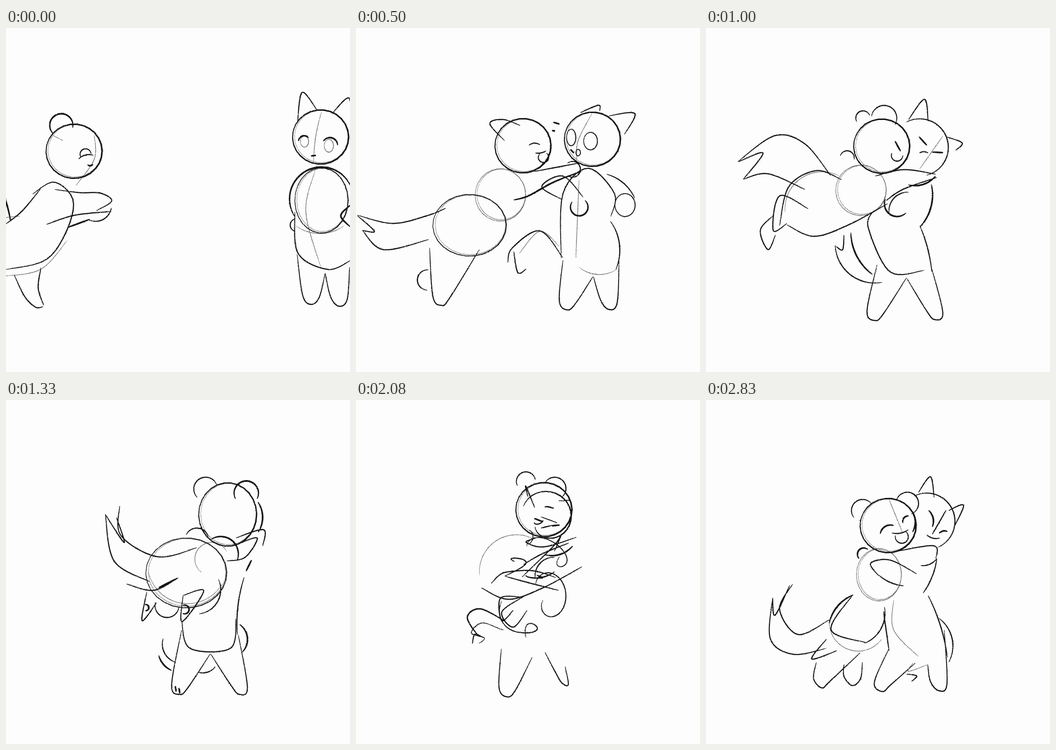
An HTML page for the animation above (3410 ms loop, 748 by 748 pixels).

```html
<!DOCTYPE html>
<html lang="en">
<head>
<meta charset="utf-8">
<title>Running hug</title>
<style>
html, body { margin: 0; width: 100%; height: 100%; overflow: hidden; background: #fdfdfd; }
svg { display: block; width: 100vw; height: 100vh; }
</style>
</head>
<body>
<svg viewBox="0 0 748 748">
  <filter id="grain" x="0" y="0" width="748" height="748" filterUnits="userSpaceOnUse">
    <feTurbulence type="fractalNoise" baseFrequency=".7" numOctaves="2" seed="4"/>
    <feDisplacementMap in="SourceGraphic" scale="2.2" xChannelSelector="R" yChannelSelector="G"/>
  </filter>
  <g filter="url(#grain)" fill="#161616">
    <path id="faint" opacity=".62"/>
    <path id="dark"/>
  </g>
</svg>
<script>
const N = 28, LOOP = 3410;
const steps = f => Array.from({ length: N + 1 }, (_, j) => f(j / N));

// Smooth curve through a few points.
function curve(p) {
  const last = p.length / 2 - 1;
  const at = (i, k) => p[2 * Math.max(0, Math.min(last, i)) + k];
  return steps(t => {
    const i = Math.min(last - 1, Math.floor(t * last)), u = t * last - i;
    return [0, 1].map(k => {
      const a = at(i - 1, k), b = at(i, k), c = at(i + 1, k), d = at(i + 2, k);
      return b + u / 2 * (c - a + u * (2 * a - 5 * b + 4 * c - d + u * (3 * (b - c) + d - a)));
    });
  });
}

// Circular arc from one point to another; a positive bulge turns clockwise.
function arc([x1, y1, x2, y2, bulge]) {
  const c = Math.hypot(x2 - x1, y2 - y1), ux = (x2 - x1) / c, uy = (y2 - y1) / c;
  const a = 2 * Math.atan(2 * bulge / c), r = c / 2 / Math.sin(a);
  return steps(t => {
    const q = a * (2 * t - 1), s = r * Math.sin(q), h = r * (Math.cos(q) - Math.cos(a));
    return [(x1 + x2) / 2 + ux * s + uy * h, (y1 + y2) / 2 + uy * s - ux * h];
  });
}

// Odd counts end in a bulge, even counts are points.
const pen = w => (...n) => ({ w, p: n.length % 2 ? arc(n) : curve(n) });
const fine = pen(1.4), mid = pen(2.6), bold = pen(3.7);

// Starts at the left and overlaps itself a little, like a drawn ring.
const oval = w => (x, y, rx, ry = rx) => ({
  w, echo: rx > 30,
  p: steps(t => {
    const a = Math.PI * (1 + 2.14 * t);
    return [x + rx * Math.cos(a), y + ry * Math.sin(a)];
  })
});
const ring = oval(2.2), hoop = oval(1.6), skull = (x, y) => oval(3.4)(x, y, 61, 59);
const leg = (x1, y1, x, y, x2, y2) => mid(x1, y1, x - 18, y - 20, x, y, x + 18, y - 15, x2, y2);

// Parts: d = dog, c = cat; h head, b body, a arms, t tail, l legs.
const dogRun = {
  dh: [skull(148, 268), bold(102, 229, 145, 217, 37), mid(163, 281, 185, 274, 15),
    bold(177, 297, 189, 296, -3), mid(158, 285, 190, 277, 5), fine(103, 234, 124, 245),
    fine(192, 233, 192, 285, 152, 343)],
  db: [mid(58, 361, 105, 335, 146, 375, 130, 445, 85, 505, 0, 525), fine(133, 462, 75, 525, -10, 540),
    mid(75, 350, 35, 398, 0, 426)],
  da: [mid(106, 351, 160, 358, 205, 359, 230, 376, 197, 397), mid(88, 427, 150, 407, 229, 399),
    mid(229, 391, 180, 417, 14), bold(136, 433, 182, 416)],
  dt: [bold(-15, 340, 10, 420, 3), fine(-10, 413, 30, 409)],
  dl: [mid(18, 537, 40, 583, 64, 607, 80, 606), mid(76, 522, 70, 565, 82, 603)]
};
const catRun = {
  ch: [skull(684, 237), mid(634, 203, 644, 140, 676, 178), mid(709, 186, 745, 152, 752, 200),
    bold(636, 246, 658, 239, 8), bold(690, 246, 721, 255, 12), bold(663, 278, 674, 277),
    fine(686, 183, 669, 290, -4), hoop(649, 247, 9, 12), hoop(702, 256, 10, 14)],
  cb: [bold(628, 410, 750, 345, 76), mid(628, 400, 635, 490, 700, 525, 750, 505), ring(686, 375, 58, 71),
    fine(630, 430, 735, 430, -17), fine(672, 310, 652, 400, 685, 522)],
  ca: [bold(750, 384, 728, 408, 748, 432), mid(629, 415, 629, 442, -11)],
  cl: [leg(633, 492, 663, 601, 694, 533), leg(694, 533, 724, 605, 747, 520)]
};
const dogGrab = {
  dh: [skull(363, 256), mid(323, 245, 291, 208, 320, 199, 357, 212), mid(376, 255, 400, 254, 4),
    mid(390, 272, 414, 267, -2), mid(400, 273, 414, 272, -20)],
  db: [hoop(314, 363, 55, 57), ring(247, 429, 80, 67)],
  da: [mid(388, 312, 483, 294), bold(343, 374, 375, 365, 430, 335, 490, 312), mid(460, 294, 462, 322, 27)],
  dt: [mid(3, 407, 80, 425, 155, 408, 195, 392), mid(3, 408, 40, 442, 14, 440), mid(14, 440, 60, 482, 158, 460)],
  dl: [leg(160, 478, 185, 603, 268, 482), mid(158, 526, 155, 570, -23)],
  fx: [bold(429, 205, 443, 209), bold(426, 223, 433, 224)]
};
const catGrab = {
  ch: [skull(514, 242), mid(488, 184, 527, 168, 530, 180), mid(550, 191, 606, 186, 584, 231),
    ring(468, 238, 10, 18), ring(510, 246, 15, 19), bold(466, 264, 474, 272),
    fine(513, 186, 483, 245, 480, 290), ring(483, 271, 5, 7)],
  cb: [mid(446, 500, 450, 360, 505, 305, 562, 360, 554, 410), mid(553, 420, 565, 525, 14),
    fine(485, 520, 568, 524, -14), fine(485, 330, 478, 500)],
  ca: [mid(545, 318, 606, 370, 9), mid(448, 373, 404, 345, 450, 322, 494, 368),
    bold(470, 378, 498, 375, -32), ring(585, 385, 22, 25)],
  cl: [leg(450, 505, 460, 613, 515, 541), leg(516, 540, 550, 612, 572, 500)],
  ct: [mid(450, 500, 400, 441, 340, 478, 330, 510), fine(442, 475, 400, 442, 355, 490),
    mid(343, 486, 352, 532, 370, 524)]
};
const dogLeap = {
  dh: [skull(382, 257), mid(360, 192, 411, 210, 33), mid(328, 204, 356, 190, 17),
    bold(411, 246, 423, 268), mid(404, 272, 428, 277, -15)],
  db: [hoop(337, 353, 55), mid(160, 430, 180, 345, 240, 310, 295, 330),
    mid(176, 428, 235, 453, 310, 428, 395, 382), fine(172, 400, 290, 322, 42)],
  da: [mid(368, 322, 430, 308, 500, 318), mid(392, 375, 430, 350, 502, 325),
    mid(292, 278, 322, 286, 15), bold(440, 341, 499, 322, -9)],
  dt: [mid(70, 290, 150, 234, 215, 252, 271, 321), mid(70, 291, 124, 272, 81, 329), mid(81, 329, 135, 317, 215, 351)],
  dl: [mid(222, 393, 160, 365, 146, 440, 176, 425), mid(146, 408, 118, 440, 135, 482, 151, 450)]
};
const catLeap = {
  ch: [mid(435, 205, 480, 320, 70), mid(440, 200, 475, 155, 483, 203), mid(524, 237, 557, 250, 543, 266),
    bold(463, 236, 480, 255), bold(492, 270, 516, 271), mid(464, 272, 483, 272, 3), fine(465, 306, 515, 235)],
  cb: [mid(475, 527, 400, 530, 353, 435, 362, 400), mid(465, 430, 491, 530, 4), bold(465, 433, 490, 340, -12)],
  ca: [bold(390, 372, 435, 402, -22), mid(440, 357, 398, 402, -14)],
  cl: [leg(372, 515, 368, 636, 436, 543), leg(437, 545, 497, 634, 490, 520)],
  ct: [bold(362, 536, 315, 445, 12), mid(383, 553, 281, 472, 30), mid(283, 475, 297, 482, 300, 450)]
};
const dogNear = {
  dh: [oval(3)(482, 249, 63, 69), bold(499, 215, 546, 215, 39), mid(416, 212, 458, 184, 31)],
  db: [fine(425, 375, 480, 330, 45), ring(392, 376, 88, 76), fine(310, 375, 470, 400, -55), bold(332, 408, 374, 387)],
  da: [mid(500, 300, 560, 282, 558, 318), mid(500, 315, 546, 300, 520, 342, 480, 350),
    mid(392, 293, 440, 300, 18), bold(446, 303, 503, 348, 26)],
  dt: [mid(247, 231, 250, 295, 330, 341, 415, 321), mid(216, 249, 257, 310, 240, 255),
    mid(216, 248, 235, 350, 312, 395), mid(262, 400, 320, 414, 372, 388)],
  dl: [mid(385, 425, 383, 482, 430, 415, 385, 425), mid(306, 418, 296, 480, 328, 440),
    mid(325, 440, 376, 450, -28), mid(420, 465, 462, 390, -22), bold(302, 445, 303, 458, 8), bold(384, 447, 384, 464, 14)]
};
const catNear = {
  ch: [bold(548, 222, 548, 288, 10)],
  cb: [mid(500, 475, 488, 540, 400, 540, 382, 480), mid(518, 385, 503, 510, -6), bold(522, 372, 534, 348)],
  cl: [leg(382, 500, 378, 640, 444, 552), leg(445, 552, 507, 640, 505, 510), bold(368, 622, 370, 634), bold(376, 626, 378, 638)],
  ct: [bold(508, 488, 514, 548, 14), mid(455, 580, 418, 592, 6), mid(342, 518, 368, 570, -12), bold(332, 555, 360, 588, -5)]
};
const dogSwing = {
  dh: [skull(377, 213), mid(404, 161, 424, 207, 31), mid(316, 162, 366, 150, 31), mid(352, 213, 380, 196, 4),
    mid(314, 253, 328, 239, 3), mid(360, 158, 342, 215), bold(425, 180, 402, 274, 24)],
  db: [mid(402, 275, 430, 302, 500, 305, 540, 345), mid(370, 360, 437, 415, 515, 435)],
  da: [mid(358, 270, 275, 300, 300, 322, 400, 272), mid(278, 334, 365, 290), fine(404, 280, 370, 335, 16)],
  dt: [mid(595, 472, 655, 390, 620, 325, 534, 330), mid(562, 405, 510, 408, 565, 418, 508, 430),
    mid(508, 430, 555, 470, 608, 470), mid(540, 345, 550, 410, 30)],
  dl: [mid(438, 457, 410, 490, 430, 513, 450, 482), mid(525, 440, 458, 475, 490, 499, 535, 458), fine(400, 390, 440, 457, -14)]
};
const catSwing = {
  ch: [skull(296, 250), mid(250, 214, 205, 212, 236, 258), fine(300, 195, 325, 162), bold(254, 272, 276, 268),
    bold(300, 270, 312, 266), mid(282, 278, 312, 266, -3), mid(281, 195, 302, 292), fine(266, 197, 285, 300)],
  cb: [ring(278, 499, 72, 71), ring(316, 364, 58, 71), bold(270, 330, 238, 415, 10)],
  ca: [mid(290, 383, 330, 362, 370, 338)],
  cl: [leg(202, 560, 232, 648, 272, 569), mid(327, 545, 362, 632, -4), mid(272, 569, 312, 618), bold(340, 637, 366, 634)],
  ct: [mid(230, 420, 145, 390, 105, 460, 165, 578), fine(200, 440, 145, 410, 130, 470, 210, 520, 195, 578),
    mid(165, 578, 162, 530, 195, 576), bold(183, 422, 206, 475)]
};
const dogHug = {
  dh: [skull(396, 273), mid(414, 219, 446, 248, 36), mid(322, 256, 360, 226, 25), bold(379, 291, 408, 273, 8),
    mid(404, 289, 440, 282, -4), bold(428, 267, 441, 252, 5), mid(412, 294, 434, 286, -22), fine(398, 216, 428, 290)],
  db: [hoop(376, 380, 49, 57), mid(350, 528, 272, 500, 318, 425), fine(268, 480, 382, 520, -45),
    mid(345, 529, 388, 450, -16), bold(268, 485, 320, 424, 10)],
  da: [mid(410, 330, 495, 317, 500, 345), mid(467, 360, 502, 345, -5), bold(333, 345, 352, 325, 13)],
  dt: [mid(188, 401, 160, 455, 200, 510, 268, 478), mid(145, 430, 150, 468, 182, 403),
    mid(145, 430, 140, 520, 190, 553, 262, 540), mid(262, 520, 230, 563, 285, 545)],
  dl: [leg(240, 570, 252, 626, 335, 550), leg(300, 575, 318, 621, 340, 570)]
};
const catHug = {
  ch: [mid(452, 209, 505, 320, 63), mid(462, 201, 488, 167, 496, 212), mid(528, 240, 560, 229, 540, 275),
    bold(484, 240, 492, 276, 6), bold(507, 290, 525, 286, 3), mid(480, 293, 508, 300, -4),
    mid(522, 240, 492, 292), bold(447, 240, 449, 287, 7)],
  cb: [fine(462, 558, 408, 500, 408, 435), mid(398, 545, 386, 460), mid(472, 420, 502, 345, -5), mid(483, 425, 525, 560, 6)],
  ca: [mid(458, 378, 400, 348, 358, 355, 375, 382), mid(375, 380, 430, 404, -5)],
  cl: [leg(398, 540, 384, 634, 455, 572), leg(482, 575, 506, 632, 518, 500)],
  ct: [mid(507, 475, 528, 570, 18), fine(450, 572, 440, 590, 483, 575), mid(436, 596, 458, 600, 447, 612)]
};

const move = (s, dx, dy) => ({ ...s, p: s.p.map(([x, y]) => [x + dx, y + dy]) });
const leap = { ...dogLeap, ...catLeap };
const leapAgain = Object.fromEntries(Object.entries(leap).map(([k, v]) => [k, v.map(s => move(s, 58, 7))]));
const keys = [
  [0, { ...dogRun, ...catRun }], [6, { ...dogGrab, ...catGrab }], [12, leap],
  [16, { ...dogNear, ...catNear }], [21, { ...dogSwing, ...catSwing }],
  [29, leapAgain], [34, { ...dogHug, ...catHug }]
];

const mix = (a, b, u) => a + (b - a) * u;
const blend = (a, b, u) => ({
  w: mix(a.w, b.w, u),
  echo: a.echo && b.echo || (u ? false : a.echo),
  p: a.p.map(([x, y], i) => [mix(x, b.p[i][0], u), mix(y, b.p[i][1], u)])
});
const centre = s => [0, 1].map(k => s.p.reduce((sum, q) => sum + q[k], 0) / s.p.length);

// Paired strokes morph; spare ones ride with their part and swap halfway.
function between(A, B, u) {
  const out = [];
  for (const k of new Set([...Object.keys(A), ...Object.keys(B)])) {
    const a = A[k] || [], b = B[k] || [], n = Math.min(a.length, b.length);
    for (let i = 0; i < n; i++) out.push(blend(a[i], b[i], u));
    const [p, q] = n ? [centre(a[0]), centre(b[0])] : [[0, 0], [0, 0]];
    const v = u < .5 ? u : u - 1;
    for (const s of (u < .5 ? a : b).slice(n)) out.push(move(s, (q[0] - p[0]) * v, (q[1] - p[1]) * v));
  }
  return out;
}

// A lighter second pass just inside a large ring.
function echo(s) {
  const [cx, cy] = centre(s);
  return { w: 1.1, p: s.p.map(([x, y]) => [mix(cx, x, .96) + 2, mix(cy, y, .97) - 1]) };
}

// Pencil line: an outline that thins towards both ends.
function outline({ w, p }) {
  const left = [], right = [];
  p.forEach(([x, y], i) => {
    const a = p[Math.max(0, i - 1)], b = p[Math.min(N, i + 1)];
    const dx = b[0] - a[0], dy = b[1] - a[1], len = Math.hypot(dx, dy) || 1;
    const h = w / 2 * (.4 + .6 * Math.sqrt(Math.sin(Math.PI * i / N) + 1e-6));
    const nx = dy / len * h, ny = dx / len * h;
    left.push((x - nx).toFixed(1) + ' ' + (y + ny).toFixed(1));
    right.unshift((x + nx).toFixed(1) + ' ' + (y - ny).toFixed(1));
  });
  return 'M' + left.concat(right).join('L') + 'Z';
}

const faint = document.getElementById('faint'), dark = document.getElementById('dark');
let shown = -1;

function draw(step) {
  let k = 0;
  while (k < keys.length - 2 && keys[k + 1][0] <= step) k++;
  const [t0, A] = keys[k], [t1, B] = keys[k + 1];
  const lines = between(A, B, (step - t0) / (t1 - t0));
  lines.push(...lines.filter(s => s.echo).map(echo));
  faint.setAttribute('d', lines.filter(s => s.w < 1.7).map(outline).join(''));
  dark.setAttribute('d', lines.filter(s => s.w >= 1.7).map(outline).join(''));
}

const start = performance.now();
function tick() {
  const t = (performance.now() - start) % LOOP;
  // twelve drawings a second, on a 10 ms clock
  const step = Math.min(34, Math.ceil(12 * (Math.floor(t / 10) + 1) / 100) - 1);
  if (step !== shown) draw(shown = step);
  requestAnimationFrame(tick);
}
tick();
</script>
</body>
</html>
```
